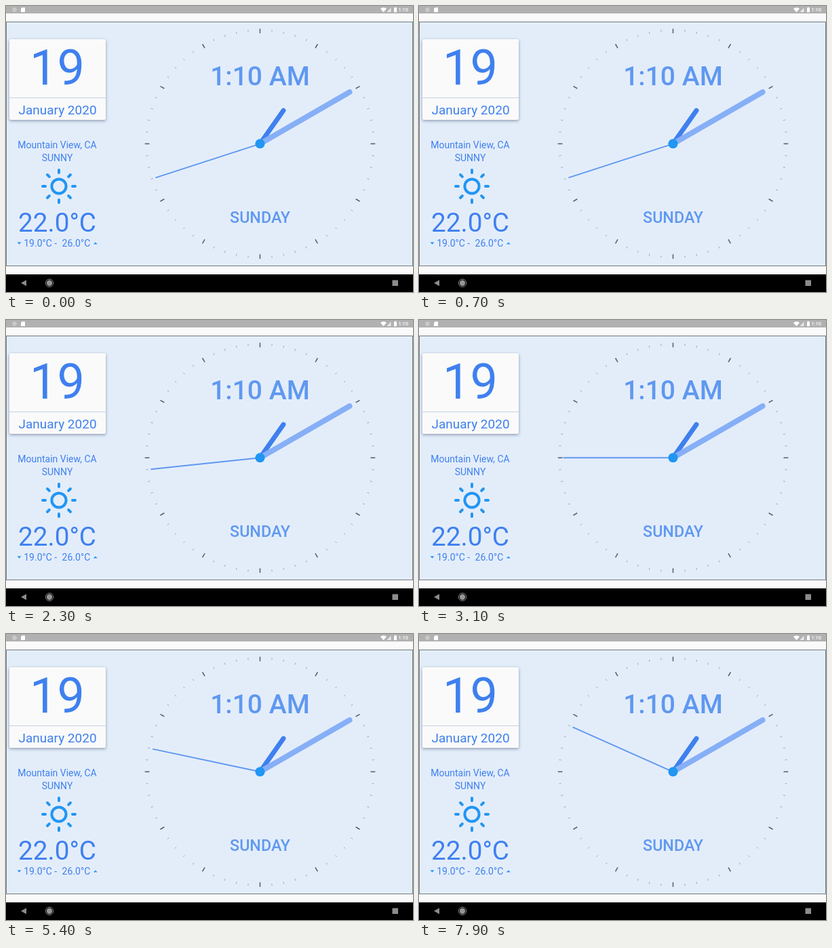
An HTML page with a canvas for the animation above (8000 ms loop, 600 by 422 pixels).

```html
<!DOCTYPE html>
<html lang="en">
<head>
<meta charset="utf-8">
<title>Clock</title>
<style>
html, body { margin: 0; width: 100%; height: 100%; overflow: hidden; background: #000; }
canvas { display: block; width: 600px; height: 422px; }
</style>
</head>
<body>
<canvas id="stage" width="600" height="422"></canvas>
<script>
const ctx = document.getElementById('stage').getContext('2d');
const LOOP = 8000;
const CX = 374.5, CY = 203.3;
const BLUE = '#3f80ef', SOFT = '#5f98f0', ACCENT = '#2196f3';

function rect(x, y, w, h, fill) {
  ctx.fillStyle = fill;
  ctx.fillRect(x, y, w, h);
}

function disc(x, y, r, fill) {
  ctx.fillStyle = fill;
  ctx.beginPath();
  ctx.arc(x, y, r, 0, Math.PI * 2);
  ctx.fill();
}

function ring(x, y, r, width, color) {
  ctx.strokeStyle = color;
  ctx.lineWidth = width;
  ctx.beginPath();
  ctx.arc(x, y, r, 0, Math.PI * 2);
  ctx.stroke();
}

function poly(fill, ...pts) {
  ctx.fillStyle = fill;
  ctx.beginPath();
  for (const [x, y] of pts) ctx.lineTo(x, y);
  ctx.fill();
}

// Line along a ray; the angle runs clockwise from 12 o'clock, in degrees.
function spoke(x, y, deg, from, to, width, color, cap = 'butt') {
  const a = deg * Math.PI / 180, dx = Math.sin(a), dy = -Math.cos(a);
  ctx.strokeStyle = color;
  ctx.lineWidth = width;
  ctx.lineCap = cap;
  ctx.beginPath();
  ctx.moveTo(x + dx * from, y + dy * from);
  ctx.lineTo(x + dx * to, y + dy * to);
  ctx.stroke();
}

function text(str, x, y, size, color, align = 'center', weight = 400) {
  ctx.font = `${weight} ${size}px Roboto, sans-serif`;
  ctx.textAlign = align;
  ctx.fillStyle = color;
  ctx.fillText(str, x, y);
}

function drawSystemBars() {
  rect(0, 0, 600, 11, '#b1b1b1');
  ring(12.5, 5.5, 2.6, 1, '#e2e2e2');
  disc(12.5, 5.5, 1, '#e2e2e2');
  poly('#fff', [22, 4], [23.7, 2.3], [28, 2.3], [28, 9], [22, 9]);
  poly('#fff', [552, 4], [554, 2.7], [556.5, 2.2], [559, 2.7], [561, 4], [556.5, 9.3]);
  poly('#e8e8e8', [561.5, 9], [567.5, 9], [567.5, 2.5]);
  rect(572, 2.6, 4, 6.6, '#fff');
  rect(573, 1.8, 2, 1, '#fff');
  text('1:10', 593, 8.4, 7.4, '#fff', 'right', 500);

  rect(0, 396, 600, 26, '#000');
  poly('#8c8c8c', [22, 408.7], [30, 404.2], [30, 413.2]);
  disc(64, 408.7, 4.2, '#969696');
  ring(64, 408.7, 5.7, 1, '#8c8c8c');
  rect(569.5, 404.5, 8.5, 8.5, '#8c8c8c');
}

function drawCard() {
  ctx.save();
  ctx.shadowColor = 'rgba(50,70,100,.5)';
  ctx.shadowBlur = 4;
  ctx.shadowOffsetY = 1.5;
  ctx.fillStyle = '#fafafa';
  ctx.beginPath();
  ctx.roundRect(5, 49, 142, 119, 2);
  ctx.fill();
  ctx.restore();
  rect(5, 135, 142, 1, '#c5d3e6');
  text('19', 75.5, 115.5, 72, BLUE);
  text('January 2020', 76, 160, 19, BLUE);
}

function drawWeather() {
  text('Mountain View, CA', 75.5, 210, 14, BLUE);
  text('SUNNY', 75.5, 229, 14, BLUE);
  ring(78, 266, 10.6, 4, ACCENT);
  for (let i = 0; i < 8; i++) spoke(78, 266, i * 45, 20, 24, 4, ACCENT, 'round');
  text('22.0°C', 75.5, 333, 38.7, BLUE);
  text('19.0°C -', 26.2, 355, 14, BLUE, 'left');
  text('26.0°C', 82.6, 355, 14, BLUE, 'left');
  poly(ACCENT, [16.5, 348.6], [22.5, 348.6], [19.5, 351.8]);
  poly(ACCENT, [128.8, 351.6], [134.8, 351.6], [131.8, 348.4]);
}

function drawClock(sec) {
  for (let i = 0; i < 60; i++) {
    if (i % 5) spoke(CX, CY, i * 6, 166, 169, 1, '#98a4b5');
    else spoke(CX, CY, i * 6, 163, 169.8, 1.6, '#566476');
  }
  text('1:10 AM', CX, 117, 39, SOFT, 'center', 500);
  text('SUNDAY', CX, 320.3, 23.3, SOFT, 'center', 500);
  spoke(CX, CY, 35, 0, 60, 7, BLUE, 'round');
  spoke(CX, CY, 60, 0, 152.5, 8, '#86aff7', 'round');
  spoke(CX, CY, sec * 6, 0, 162, 1.9, SOFT);
  disc(CX, CY, 7, ACCENT);
}

function draw(t) {
  // The hand jumps once a second, 100 ms after each full second.
  const sec = 42 + Math.max(0, Math.floor((t - 100) / 1000));
  rect(0, 0, 600, 422, '#fafafa');
  rect(0, 23, 600, 361, '#737a82');
  rect(1, 24, 598, 359, '#e3edfa');
  drawSystemBars();
  drawCard();
  drawWeather();
  drawClock(sec);
}

const start = performance.now();
function tick() {
  draw((performance.now() - start) % LOOP);
  requestAnimationFrame(tick);
}
tick();
</script>
</body>
</html>
```
